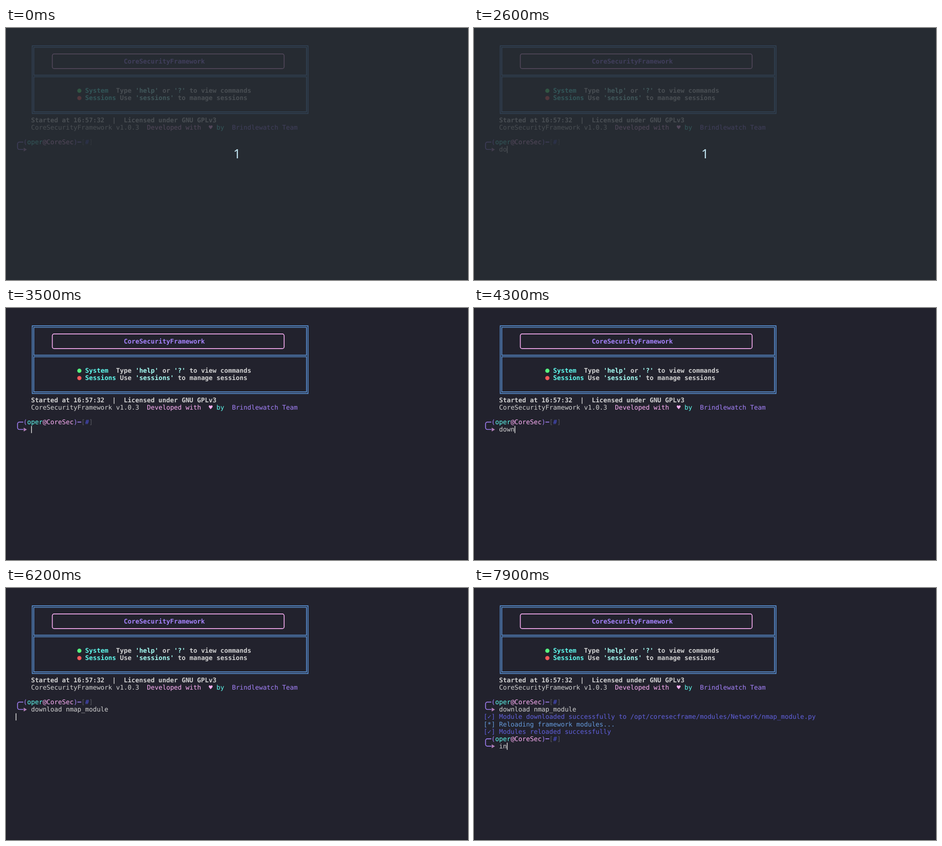
An HTML page with a canvas that plays this animation: 1013 by 553 pixels, repeating every 8 s.

```html
<!DOCTYPE html>
<html lang="en">
<head>
<meta charset="utf-8">
<title>Terminal session</title>
<style>
  html, body { margin: 0; width: 100%; height: 100%; overflow: hidden; background: #22222d; }
  canvas { display: block; width: 1013px; height: 553px; }
</style>
</head>
<body>
<canvas id="stage" width="1013" height="553"></canvas>
<script>
const ctx = document.getElementById('stage').getContext('2d');
const W = 1013, H = 553, LOOP = 8000;

// Terminal grid
const CELL_W = 8.47, CELL_H = 16.12, LEFT = 21.1, TOP = 0.5;
const FONT = '14.07px "DejaVu Sans Mono", monospace';

const C = {
  bg: '#22222d', edge: '#191a22', text: '#d2d2d2', purple: '#a582fb', pink: '#ffb1f8',
  frame: '#5c96dc', cyan: '#5ffbee', pale: '#a6fff5', green: '#58f580', red: '#fb5a5a',
  indigo: '#6060dc', info: '#659bdc', hash: '#4b50d2', gray: '#57585e', arrow: '#b07db6'
};

const colX = c => LEFT + c * CELL_W;
const rowY = r => TOP + r * CELL_H;
const midX = c => colX(c + 0.5);
const midY = r => rowY(r + 0.5);

// [time, typed text, caret visible]
const firstLine = [
  [0, '', 0], [100, '', 1], [600, '', 0], [1000, '', 1], [1600, '', 0], [2000, '', 1],
  [2400, 'd', 1], [2600, 'do', 1], [3000, 'd', 1], [3200, '', 1], [3700, '', 0],
  [4000, 'd', 1], [4100, 'do', 1], [4200, 'dow', 1], [4300, 'down', 1],
  [4600, 'downl', 1], [4700, 'downlo', 1], [4800, 'downloa', 1], [4900, 'download ', 1],
  [5300, 'download n', 1], [5600, 'download nm', 1], [5700, 'download nmap_module', 1],
  [6200, 'download nmap_module', 0]
];
const secondLine = [[6400, '', 1], [6700, '', 0], [7200, '', 1], [7700, '', 0], [7900, 'in', 1]];
const UNDIM = 3500, ENTER = 6200, OUTPUT = 6400;

function text(row, col, str, color, bold) {
  ctx.font = (bold ? 'bold ' : '') + FONT;
  ctx.fillStyle = color;
  ctx.fillText(str, colX(col), rowY(row) + 12.9);
}

function runs(row, bold, list) {
  for (const [col, str, color] of list) text(row, col, str, color, bold);
}

function box(x1, y1, x2, y2, color, radius = 0) {
  ctx.strokeStyle = color;
  ctx.lineWidth = 1.7;
  ctx.beginPath();
  ctx.roundRect(x1, y1, x2 - x1, y2 - y1, radius);
  ctx.stroke();
}

function dot(row, color) {
  ctx.fillStyle = color;
  ctx.beginPath();
  ctx.arc(midX(16), midY(row) + 0.2, 4.6, 0, Math.PI * 2);
  ctx.fill();
}

function caret(row, col) {
  ctx.fillStyle = C.text;
  ctx.fillRect(colX(col), rowY(row) + 0.4, 1.7, 15.7);
}

function banner() {
  const gap = 1.7, l = midX(4), r = midX(75);
  const top = midY(2), mid = midY(6), bottom = midY(11);
  box(l - gap, top - gap, r + gap, bottom + gap, C.frame);
  box(l + gap, top + gap, r - gap, mid - gap, C.frame);
  box(l + gap, mid + gap, r - gap, bottom - gap, C.frame);
  box(midX(9), midY(3), midX(69), midY(5), C.pink, 4);

  text(4, 28, 'CoreSecurityFramework', C.purple, true);
  dot(8, C.green);
  runs(8, true, [
    [18, 'System', C.cyan], [26, 'Type', C.text], [31, "'help'", C.pale],
    [38, 'or', C.text], [41, "'?'", C.pale], [45, 'to view commands', C.text]
  ]);
  dot(9, C.red);
  runs(9, true, [
    [18, 'Sessions', C.cyan], [27, 'Use', C.text],
    [31, "'sessions'", C.pale], [42, 'to manage sessions', C.text]
  ]);
  text(12, 4, 'Started at 16:57:32  |  Licensed under GNU GPLv3', C.text, true);
  runs(13, false, [
    [4, 'CoreSecurityFramework v1.0.3', C.text], [34, 'Developed with', C.pink],
    [50, '♥', C.pink], [52, 'by', C.cyan], [56, 'Brindlewatch Team', C.purple]
  ]);
}

function prompt(row) {
  const x = midX(0), y1 = midY(row), y2 = midY(row + 1), r = 4;
  ctx.strokeStyle = C.purple;
  ctx.lineWidth = 1.7;
  ctx.beginPath();
  ctx.moveTo(colX(2), y1);
  ctx.arcTo(x, y1, x, y2, r);
  ctx.arcTo(x, y2, colX(2), y2, r);
  ctx.lineTo(colX(2), y2);
  ctx.moveTo(colX(16), y1);
  ctx.lineTo(colX(17), y1);
  ctx.stroke();

  ctx.fillStyle = C.arrow;
  ctx.beginPath();
  ctx.moveTo(colX(2) + 0.8, y2 - 4);
  ctx.lineTo(colX(3) - 0.6, y2 + 0.2);
  ctx.lineTo(colX(2) + 0.8, y2 + 4.4);
  ctx.fill();

  runs(row, false, [
    [2, '(', C.purple], [3, 'oper', C.cyan], [7, '@CoreSec', C.pink], [15, ')', C.purple],
    [17, '[', C.gray], [18, '#', C.hash], [19, ']', C.gray]
  ]);
}

function typed(row, steps, t) {
  const [, str, on] = steps.filter(s => s[0] <= t).pop();
  text(row, 4, str, C.text);
  if (on) caret(row, 4 + str.length);
}

function output() {
  text(17, 0, '[✓] Module downloaded successfully to /opt/coresecframe/modules/Network/nmap_module.py', C.indigo);
  text(18, 0, '[*] Reloading framework modules...', C.info);
  text(19, 0, '[✓] Modules reloaded successfully', C.indigo);
}

function countdown() {
  ctx.fillStyle = 'rgba(39, 45, 52, 0.8)';
  ctx.fillRect(0, 0, W, H);
  ctx.font = '300 28px "Noto Sans", "Open Sans", sans-serif';
  ctx.fillStyle = '#c3e6f3';
  ctx.textAlign = 'center';
  ctx.fillText('1', 506.5, 286);
  ctx.textAlign = 'left';
}

function draw(t) {
  ctx.fillStyle = C.bg;
  ctx.fillRect(0, 0, W, H);
  ctx.fillStyle = C.edge;
  ctx.fillRect(0, 0, 1, H);
  ctx.fillRect(0, H - 1, W, 1);

  banner();
  prompt(15);
  typed(16, firstLine, t);
  if (t >= OUTPUT) {
    output();
    prompt(20);
    typed(21, secondLine, t);
  } else if (t >= ENTER) {
    caret(17, 0);
  }
  if (t < UNDIM) countdown();
}

ctx.textRendering = 'geometricPrecision';
const start = performance.now();
function tick() {
  draw((performance.now() - start) % LOOP);
  requestAnimationFrame(tick);
}
tick();
</script>
</body>
</html>
```
